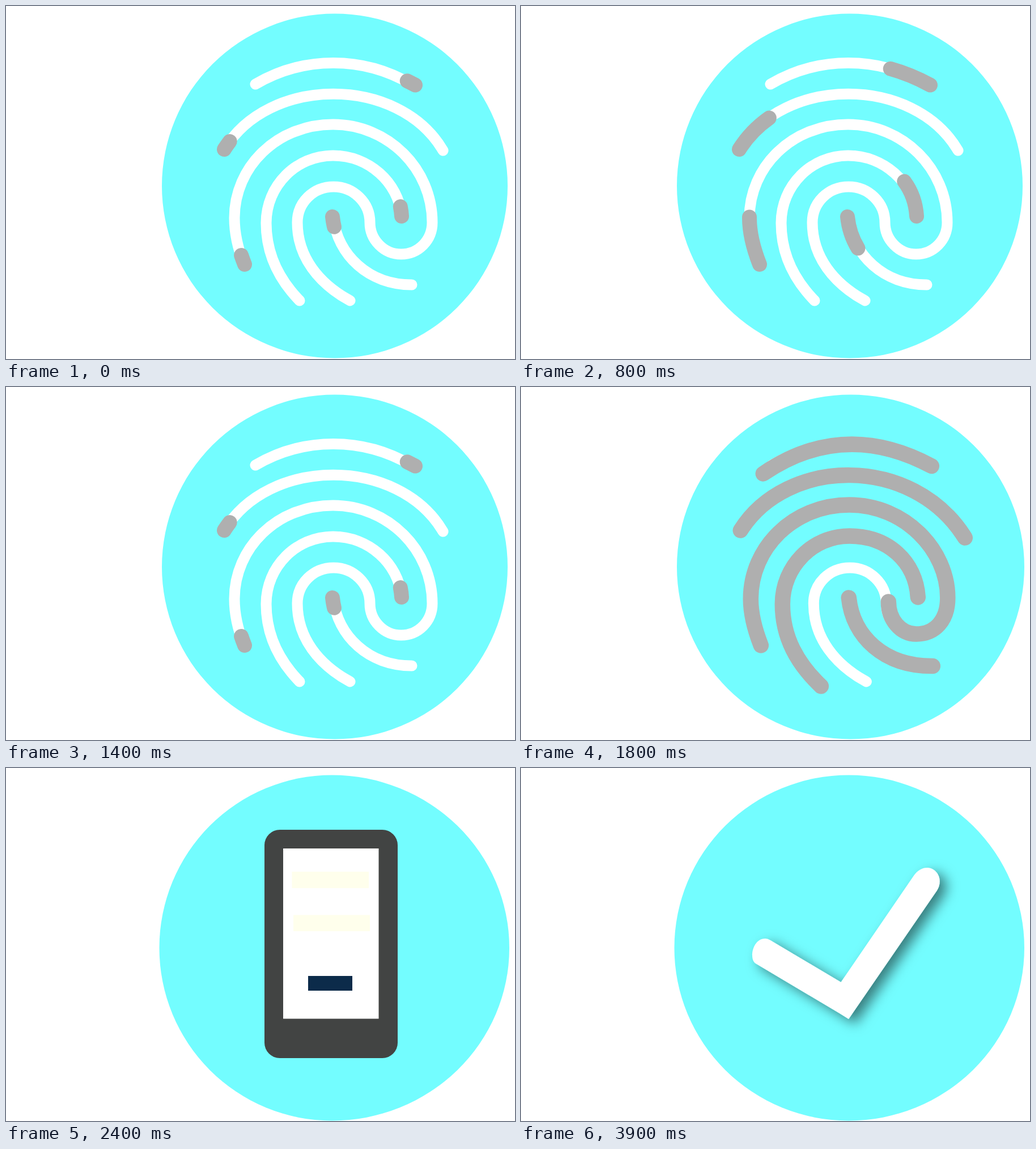
Write an HTML page that moves like this. It is 898x623 px and loops after 5.9 s.

```html
<!DOCTYPE html>
<html lang="en">
<head>
<meta charset="utf-8">
<title>Fingerprint sign-in</title>
<style>
html, body { margin: 0; width: 100%; height: 100%; overflow: hidden; background: #fff; }
svg { display: block; width: 100%; height: 100%; }
</style>
</head>
<body>
<svg viewBox="0 0 898 623">
  <defs>
    <filter id="shadow" x="-20%" y="-20%" width="150%" height="150%">
      <feDropShadow dx="12" dy="9" stdDeviation="11" flood-color="#000" flood-opacity=".5"/>
    </filter>
  </defs>
  <path id="disc" fill="#73fdff"/>
  <g id="print" fill="none" stroke-linecap="round" stroke-linejoin="round">
    <g id="ridges" stroke="#fff" stroke-width="19"></g>
    <g id="ink" stroke="#afafaf"></g>
  </g>
  <g id="phone">
    <rect x="456" y="109" width="235" height="403" rx="27" fill="#424443"/>
    <rect x="489" y="142" width="168.500" height="300.500" fill="#fff"/>
    <rect x="504.500" y="183" width="135.500" height="29" fill="#ffffec"/>
    <rect x="507" y="259.500" width="135" height="28.500" fill="#ffffec"/>
    <rect x="533" y="367" width="78" height="26" fill="#0c2b4a"/>
  </g>
  <path id="tick" fill="#fff" filter="url(#shadow)"
    d="M440 304 L564.500 378 L693 190 C704 174 722 172 732 183 C740 191 741 205 734 216 L578 443 L562 433 L414 345 C402 338 408 301 431 301 Q435 301 440 304 Z"/>
</svg>
<script>
const LOOP = 5900;
const PHONE_AT = 2400, SETTLE_AT = 3400, TICK_AT = 3900;
const $ = id => document.getElementById(id);

const whorl = 'C642 347 613 319 578 319 C542 319 514 347 514 382 C514 443 552 490 607 520';

const ridges = [
  'M440 138 C525 88 630 88 715 138',
  'M384 255 C462 122 693 122 771 255',
  'M420 456 C409 428 403 402 403 374 C403 284 478 209 577 209 C674 209 752 287 752 382 C752 413 728 438 697 438 C667 438 642 413 642 382 ' + whorl,
  'M698 370 C692 311 640 264 577 264 C512 264 459 317 459 383 C459 438 481 482 518 520',
  'M577 372 C585 440 640 492 716 492'
];

// Each ink stroke: its path and the length drawn at every stage.
const ALL = 3000;
const strokes = [
  ['M722 139.500 C628 89 528 83 425 153', [0, 16, 76, 130, 150, ALL, ALL]],
  ['M385 253 C466 124 688 118 781 266', [0, 17, 77, 130, 155, ALL, ALL]],
  ['M421 456 C410 428 403 402 403 374 C403 284 478 208 577 208 C674 208 750.500 287 750.500 372 C750.500 412 728 436 695 436 C667 436 646 410 646 379', [0, 17, 86, 138, 165, ALL, ALL]],
  ['M698 371 C694 308 645 263 577 263 C512 263 459 317 459 383 C459 442 485 488 527 528', [0, 17, 66, 112, 135, ALL, ALL]],
  ['M576 372 C583 440 638 493 724 492.500', [0, 18, 59, 95, 115, ALL, ALL]],
  ['M642 382 ' + whorl, [0, 0, 0, 0, 0, 0, ALL]]
];

// A scan has seven stages of 100 ms; every other scan holds back the last one.
function scanStage(t) {
  const step = Math.floor(t / 100);
  const stage = (step + 1) % 7;
  const held = Math.floor(step / 7) % 2 === 0;
  return held ? Math.min(stage, 5) : stage;
}

function addPath(group, d) {
  const path = document.createElementNS('http://www.w3.org/2000/svg', 'path');
  path.setAttribute('d', d);
  return group.appendChild(path);
}

function show(node, on) {
  node.style.display = on ? '' : 'none';
}

// A disc whose two halves may differ slightly in width.
function disc(left, top, right, bottom, mid = (left + right) / 2) {
  const ry = (bottom - top) / 2;
  $('disc').setAttribute('d',
    `M${mid} ${top} A${right - mid} ${ry} 0 0 1 ${mid} ${bottom} A${mid - left} ${ry} 0 0 1 ${mid} ${top} Z`);
}

ridges.forEach(d => addPath($('ridges'), d));
const ink = strokes.map(([d]) => addPath($('ink'), d));

function drawScan(t) {
  const stage = scanStage(t);
  const wide = stage > 2;
  disc(275, 13.5, wide ? 888 : 885, 621.5);
  $('print').setAttribute('transform', `translate(${wide ? 2.3 : 0} 0)`);
  $('ink').setAttribute('stroke-width', wide ? 27.5 : 26);
  ink.forEach((path, i) => {
    const length = strokes[i][1][stage];
    show(path, length > 0);
    path.setAttribute('stroke-dasharray', `${length} ${ALL}`);
  });
}

function draw(t) {
  const scanning = t < PHONE_AT;
  const done = t >= TICK_AT;
  show($('print'), scanning);
  show($('phone'), !scanning && !done);
  show($('tick'), done);
  if (scanning) drawScan(t);
  else disc(270.5, 12.5, 888, 622.5, t < SETTLE_AT ? 575 : 578);
}

const start = performance.now();
function tick(now) {
  draw(Math.max(0, now - start) % LOOP);
  requestAnimationFrame(tick);
}
draw(0);
requestAnimationFrame(tick);
</script>
</body>
</html>
```
